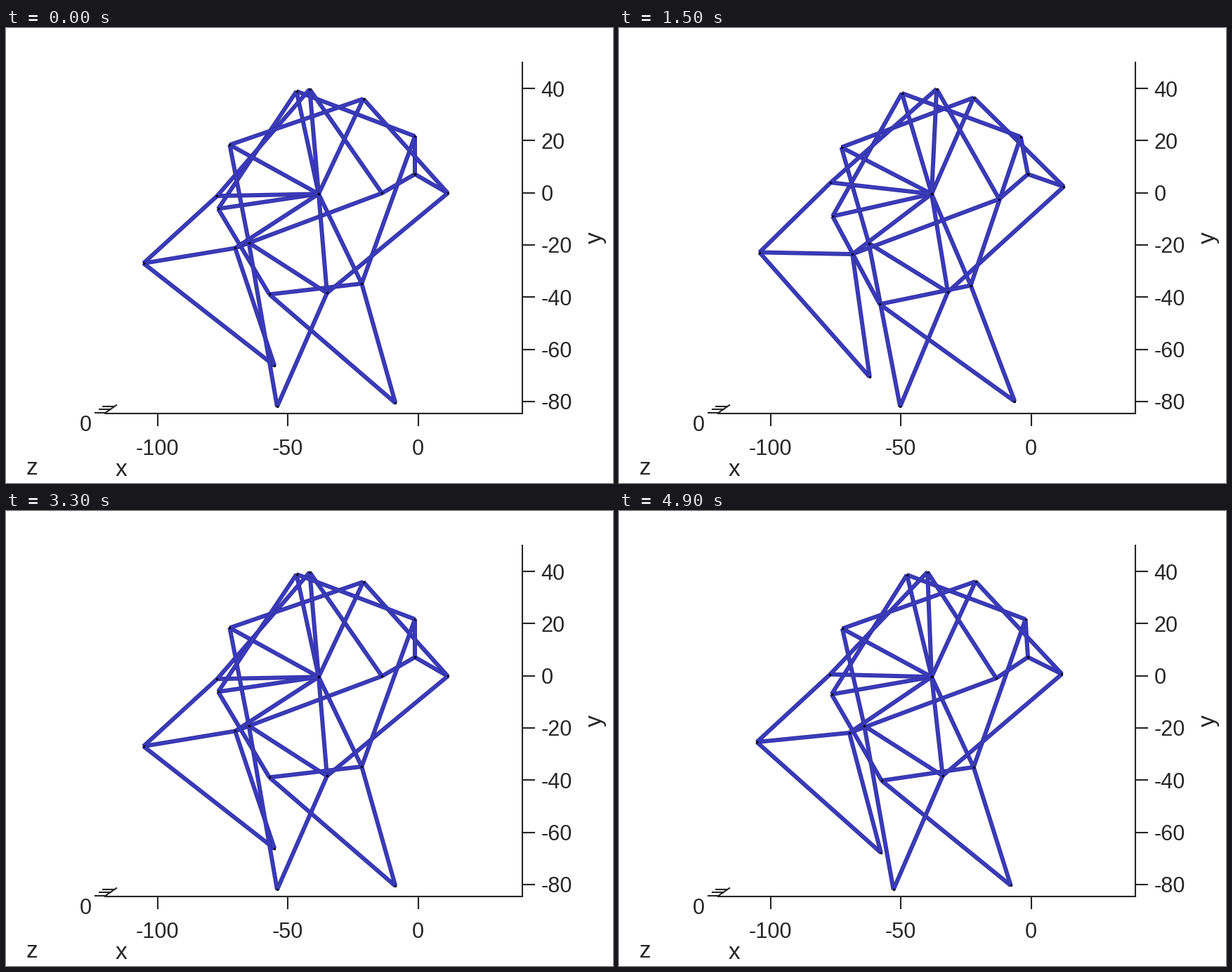
Recreate the animation shown at these times as a matplotlib script. Size 864 by 648 pixels, loop 5 s.

```python
import math

import matplotlib.pyplot as plt
from matplotlib.animation import FuncAnimation
from matplotlib.collections import LineCollection

WIDTH, HEIGHT = 864, 648
FRAMES, INTERVAL = 50, 100
INK = "#262626"
BAR_EDGE, BAR_FILL = "#3030a4", "#3b3bbb"

# Walking linkage: fixed points and bar lengths
PIVOT, AXLE = complex(-38, 0), complex(0, 7.8)
CRANK = 15
B, C, D, E, F = 41.5, 39.3, 40.1, 55.8, 39.4
G, H, I, J, K = 36.7, 65.7, 49.0, 50.0, 61.9
SCALE, ORIGIN_X, ORIGIN_Y = 3.605, 582, 236.3
STEP = -240 / 33  # crank degrees per frame


def meet(p, r, q, s):
    """Point r from p and s from q, on the left of the way from p to q."""
    gap = abs(q - p)
    along = (r * r - s * s + gap * gap) / (2 * gap)
    across = math.sqrt(max(r * r - along * along, 0))
    return p + (q - p) / gap * complex(along, across)


def leg(degrees):
    """Joints and bars of one leg at a crank angle."""
    angle = math.radians(degrees)
    crank = AXLE + CRANK * complex(math.cos(angle), math.sin(angle))
    top = meet(PIVOT, B, crank, J)
    low = meet(crank, K, PIVOT, C)
    left = meet(PIVOT, D, top, E)
    knee = meet(low, G, left, F)
    foot = meet(low, I, knee, H)
    bars = [(AXLE, crank), (crank, top), (crank, low), (PIVOT, top),
            (PIVOT, low), (PIVOT, left), (top, left), (left, knee),
            (low, knee), (knee, foot), (low, foot)]
    return [AXLE, PIVOT, crank, top, low, left, knee, foot], bars


def to_stage(p):
    return ORIGIN_X + SCALE * p.real, ORIGIN_Y - SCALE * p.imag


plt.rcParams["font.family"] = "Liberation Sans"
fig = plt.figure(figsize=(WIDTH / 72, HEIGHT / 72), dpi=72, facecolor="white")
ax = fig.add_axes([0, 0, 1, 1])
ax.set_xlim(0, WIDTH)
ax.set_ylim(HEIGHT, 0)
ax.axis("off")


def stroke(*points):
    ax.plot(*zip(*points), color=INK, lw=2.1, solid_capstyle="butt",
            solid_joinstyle="miter")


def label(x, y, text, size=30.6, **style):
    ax.text(x, y, text, size=size, color=INK,
            **{"ha": "center", "va": "baseline", **style})


stroke((735, 48), (735, 549), (140, 549), (158, 536.5))
for value in range(-80, 41, 20):
    y = 234.6 - 3.715 * value
    stroke((735, y), (753, y))
    label(761.5, y + 11.5, str(value), ha="left")
for value in (-100, -50, 0):
    x = 586.5 + 3.71 * value
    stroke((x, 549), (x, 567))
    label(x, 608.5, str(value))
for x, y in ((126, 547.5), (131.5, 543), (137, 538.7)):
    stroke((x, y), (x + 18, y))
label(113.5, 574.5, "0")
label(164.5, 638.5, "x", 33.5)
label(37.5, 636, "z", 33.5)
label(839, 299, "y", 33.5, va="center", rotation=90)

bars = LineCollection([], linewidths=[6, 4], colors=[BAR_EDGE, BAR_FILL],
                      capstyle="butt", zorder=3)
ax.add_collection(bars, autolim=False)
joints, = ax.plot([], [], "o", color="black", ms=3.4, mew=0, zorder=4)


def update(frame):
    segments, points = [], []
    for offset in (90, 210, 330):
        leg_joints, leg_bars = leg(offset + STEP * frame)
        points += map(to_stage, leg_joints)
        for start, end in leg_bars:
            segments += [[to_stage(start), to_stage(end)]] * 2
    bars.set_segments(segments)
    joints.set_data(*zip(*points))
    return bars, joints


animation = FuncAnimation(fig, update, frames=FRAMES, interval=INTERVAL,
                          repeat=True, repeat_delay=0)
plt.show()
```
